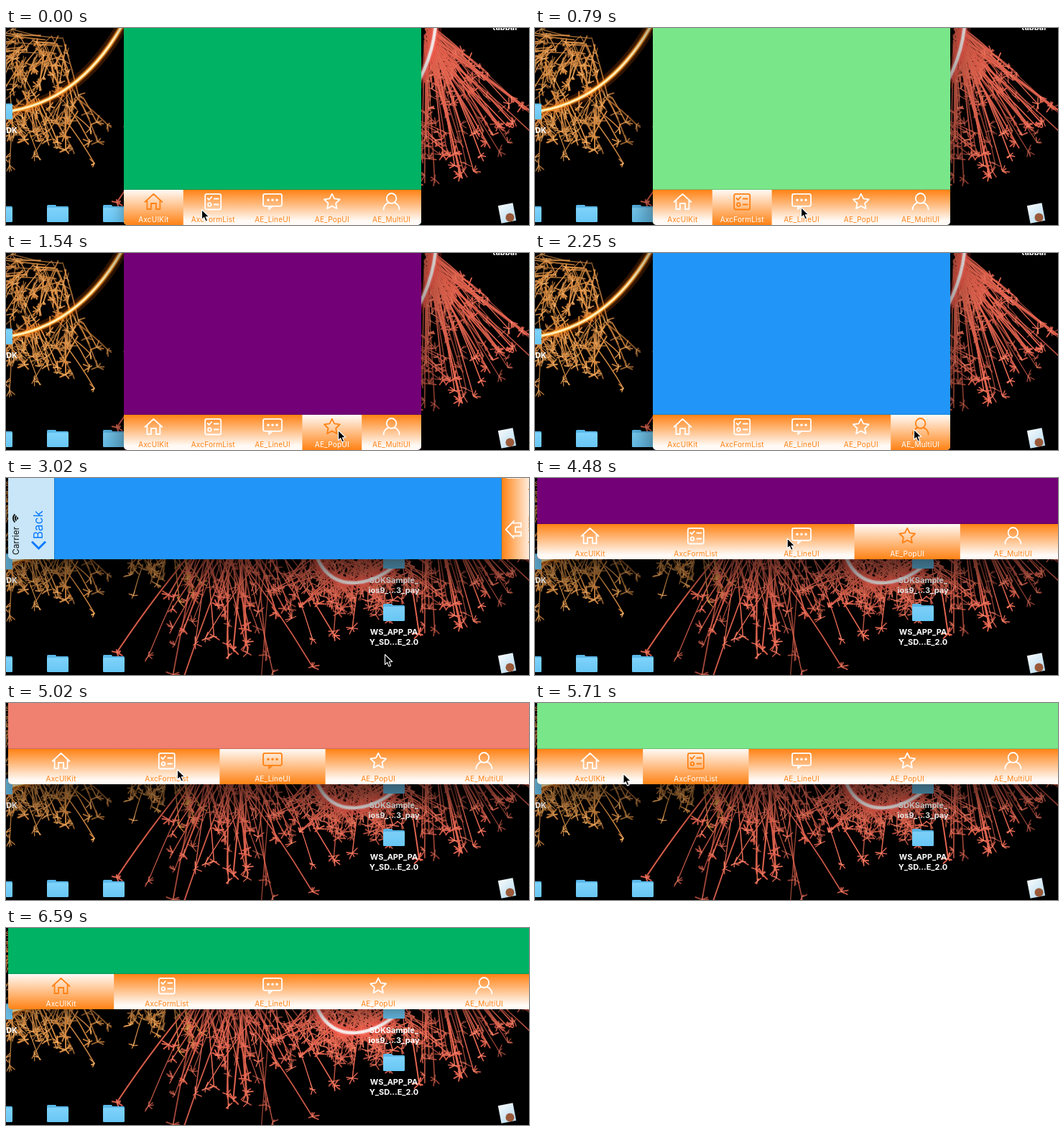
An HTML page with a canvas that plays this animation: 728x274 px, repeating every 6.69 s.

```html
<!DOCTYPE html>
<html lang="en">
<head>
<meta charset="utf-8">
<title>Tab bar demo</title>
<style>
html, body { margin: 0; width: 100%; height: 100%; overflow: hidden; background: #000; }
canvas { display: block; width: 728px; height: 274px; }
</style>
</head>
<body>
<canvas id="stage" width="728" height="274"></canvas>
<script>
const W = 728, H = 274, LOOP = 6690;
const ctx = document.getElementById('stage').getContext('2d');
const FONT = 'Inter, sans-serif';
const LABELS = ['AxcUIKit', 'AxcFormList', 'AE_LineUI', 'AE_PopUI', 'AE_MultiUI'];
const PAGES = ['#00b264', '#7ae68a', '#f08070', '#730076', '#2196f8'];
const ORANGE = '#ff8214', PALE = '#fffaf6', BAR = 49;
const CENTER = { x: 371, y: -94 }, SHORT = 414, LONG = 736;
const FOCUS = 410, BLUR = 6590, TURN = 3020, TURN_END = 3380, GONE = 6050, TICK = 60;

// Each click selects a tab; then the pointer glides on to the next click.
const CLICKS = [
  { t: 410, tab: 1, x: 272, y: 252 },
  { t: 1030, tab: 2, x: 370, y: 249 },
  { t: 1540, tab: 3, x: 462, y: 246 },
  { t: 2250, tab: 4, x: 527, y: 245, leave: 3490, glide: 470 },
  { t: 4200, tab: 3, x: 462, y: 71 },
  { t: 4780, tab: 2, x: 346, y: 84, glide: 240 },
  { t: 5260, tab: 1, x: 238, y: 92, glide: 450 },
  { t: 5770, tab: 0, x: 122, y: 98, glide: 220 }
];
const EXIT = { x: 608, y: 262 };

const clamp = v => Math.max(0, Math.min(1, v));
const lerp = (a, b, p) => a + (b - a) * p;
const easeInOut = p => p * p * (3 - 2 * p);
const easeOut = p => 1 - (1 - p) ** 2;
const ticked = (dt, span) => clamp(Math.floor(dt / TICK) * TICK / span);

function random(seed) {
  return () => {
    seed = (seed + 0x6D2B79F5) | 0;
    let r = Math.imul(seed ^ (seed >>> 15), 1 | seed);
    r = (r + Math.imul(r ^ (r >>> 7), 61 | r)) ^ r;
    return ((r ^ (r >>> 14)) >>> 0) / 4294967296;
  };
}

function text(c, str, x, y, font, color, align = 'center', spacing = 0) {
  c.font = font + ' ' + FONT;
  c.letterSpacing = spacing + 'px';
  c.textAlign = align;
  c.fillStyle = color;
  c.fillText(str, x, y);
}

function strokes(c, path, layers) {
  layers.forEach(([width, color]) => {
    c.lineWidth = width;
    c.strokeStyle = color;
    c.stroke(path);
  });
}

// ---- desktop ----
function spray(c, rnd, { x, y, spread, from, to, reach, count, color, core }) {
  for (let i = 0; i < count; i++) {
    const px = x + (rnd() - 0.5) * spread, py = y + (rnd() - 0.5) * 40;
    const a = lerp(from, to, rnd()) * Math.PI / 180;
    const len = reach * (0.2 + 0.8 * rnd() ** 1.5);
    const ex = px + Math.cos(a) * len, ey = py + Math.sin(a) * len;
    const path = new Path2D();
    path.moveTo(px, py);
    path.quadraticCurveTo(lerp(px, ex, 0.55), lerp(py, ey, 0.48), ex, ey);
    for (let k = 0; k < 6; k++) {
      const b = rnd() * 2 * Math.PI, r = 3 + rnd() * 7;
      path.moveTo(ex, ey);
      path.lineTo(ex + Math.cos(b) * r, ey + Math.sin(b) * r);
    }
    c.globalAlpha = 0.5 + rnd() * 0.5;
    strokes(c, path, [[1.2 + rnd(), color], [0.5, core]]);
  }
  c.globalAlpha = 1;
}

function folder(c, x, y) {
  const g = c.createLinearGradient(0, y - 8, 0, y + 12);
  g.addColorStop(0, '#7ed3fb');
  g.addColorStop(1, '#68c6f3');
  const box = (w, top, h, fill) => {
    c.fillStyle = fill;
    c.beginPath();
    c.roundRect(x - 15, y + top, w, h, 1.5);
    c.fill();
  };
  box(13, -12, 8, '#5ab9ea');
  box(30, -10, 8, '#5ab9ea');
  box(30, -8, 20, g);
}

function sheet(c, x, y) {
  c.save();
  c.translate(x, y);
  c.rotate(-0.19);
  const g = c.createLinearGradient(-8, -12, 8, 12);
  g.addColorStop(0, '#f4f9fc');
  g.addColorStop(1, '#b8dcf0');
  c.fillStyle = g;
  c.fillRect(-10.5, -12.5, 21, 25);
  c.restore();
  c.fillStyle = '#9a5a3a';
  c.beginPath();
  c.arc(x + 4, y + 6, 6, 0, 7);
  c.fill();
}

function makeDesktop() {
  const cv = document.createElement('canvas');
  cv.width = W;
  cv.height = H;
  const c = cv.getContext('2d'), rnd = random(27);
  c.fillStyle = '#010000';
  c.fillRect(0, 0, W, H);
  c.lineCap = 'round';

  const gold = { color: '#c8742c', core: '#ffd08a' };
  const red = { color: '#d8503f', core: '#ff9f80' };
  [
    { ...gold, x: 30, y: 30, spread: 110, from: 60, to: 200, reach: 80, count: 70 },
    { ...gold, x: 45, y: 105, spread: 130, from: 40, to: 140, reach: 80, count: 65 },
    { ...gold, x: 215, y: 105, spread: 80, from: 50, to: 145, reach: 60, count: 24 },
    { ...red, x: 325, y: 80, spread: 110, from: 52, to: 128, reach: 215, count: 75 },
    { ...red, x: 490, y: 120, spread: 150, from: 15, to: 165, reach: 85, count: 170 },
    { ...red, x: 588, y: 15, spread: 12, from: 35, to: 92, reach: 205, count: 95 }
  ].forEach(s => spray(c, rnd, s));

  strokes(c, new Path2D('M162 -4Q100 105 -4 117'),
    [[16, 'rgba(255,110,10,.2)'], [8, 'rgba(255,130,20,.5)'], [4.5, '#ffb84a'], [2.2, '#fff3c8']]);
  strokes(c, new Path2D('M598 -4C594 40 575 80 548 115C520 146 455 168 432 108'),
    [[18, 'rgba(255,70,60,.25)'], [9, 'rgba(255,110,100,.5)'], [5, '#f4c4bc'], [3, '#f8eeee']]);

  [-6, 72, 150].forEach(x => folder(c, x, 258));
  [114, 187].forEach(y => folder(c, 540, y));
  folder(c, -6, 115);
  const caption = (str, x, y, align) => text(c, str, x, y, '700 11px', '#fff', align);
  caption('DK', 16, 146, 'right');
  caption('tabbar', 695, 3);
  caption('SDKSample_', 540, 146);
  caption('ios9_...3_pay', 540, 160);
  caption('WS_APP_PA', 540, 218);
  caption('Y_SD...E_2.0', 540, 232);
  sheet(c, 697.5, 257.5);
  return cv;
}

// ---- icons, centred on x = 0 below the top of the bar ----
function homeIcon() {
  return new Path2D('M-12 17L0 5.8L12 17M-9 14.5V27H-3.5V19H3.5V27H9V14.5');
}

function listIcon() {
  const p = new Path2D('M-7.5 12L-5.5 14L-2 10M1.5 12.5H7.5M1.5 20.5H7.5');
  p.roundRect(-11, 5.8, 22, 21.7, 2.5);
  p.moveTo(-2.5, 20.5);
  p.arc(-4.8, 20.5, 2.3, 0, 7);
  return p;
}

function chatIcon() {
  const p = new Path2D('M-5 22.8V27L0 22.8');
  p.roundRect(-13, 5.8, 26, 17, 2.5);
  for (let x = -6; x <= 6; x += 6) {
    p.moveTo(x + 0.9, 14.3);
    p.arc(x, 14.3, 0.9, 0, 7);
  }
  return p;
}

function starIcon() {
  const p = new Path2D();
  for (let i = 0; i < 10; i++) {
    const a = i * Math.PI / 5 - Math.PI / 2, r = i % 2 ? 5.6 : 11.4;
    p.lineTo(Math.cos(a) * r, 17 + Math.sin(a) * r);
  }
  p.closePath();
  return p;
}

function userIcon() {
  const p = new Path2D('M-11 27.5C-11 22 -7 18.5 -3.5 18M11 27.5C11 22 7 18.5 3.5 18');
  p.moveTo(6.8, 12);
  p.ellipse(0, 12, 6.8, 7, 0, 0, 7);
  return p;
}

const ICONS = [homeIcon(), listIcon(), chatIcon(), starIcon(), userIcon()];

// ---- app ----
function fade(top, from, to, end) {
  const g = ctx.createLinearGradient(0, top, 0, top + BAR * end);
  g.addColorStop(0, from);
  g.addColorStop(1, to);
  return g;
}

function hairline(w, y) {
  ctx.fillStyle = 'rgba(0,0,0,.3)';
  ctx.fillRect(0, y, w, 0.5);
}

function drawBar(w, top, selected) {
  const cell = w / LABELS.length;
  hairline(w, top - 0.5);
  ctx.fillStyle = fade(top, ORANGE, PALE, 0.88);
  ctx.fillRect(0, top, w, BAR);
  ctx.fillStyle = fade(top, PALE, ORANGE, 1);
  ctx.fillRect(cell * selected, top, cell, BAR);
  ctx.lineWidth = 1.8;
  ctx.lineCap = ctx.lineJoin = 'round';
  LABELS.forEach((label, i) => {
    const on = i === selected, x = cell * (i + 0.5);
    ctx.strokeStyle = on ? ORANGE : '#fff';
    ctx.translate(x, top);
    ctx.stroke(ICONS[i]);
    ctx.translate(-x, -top);
    text(ctx, label, x, top + 45, '400 10px', on ? '#fff' : ORANGE, 'center', 0.2);
  });
}

function drawNav(w) {
  ctx.fillStyle = '#c8e6f8';
  ctx.fillRect(0, 0, w, 64);
  hairline(w, 64);
  text(ctx, 'Carrier', 6, 15, '400 12px', '#111', 'left');
  ctx.strokeStyle = '#111';
  ctx.lineWidth = 2;
  for (let r = 2; r <= 8; r += 3) {
    ctx.beginPath();
    ctx.arc(57, 15, r, -Math.PI * 0.75, -Math.PI * 0.25);
    ctx.stroke();
  }
  ctx.strokeStyle = '#0a7aff';
  ctx.lineWidth = 3;
  ctx.stroke(new Path2D('M24.5 33L15 42.5L24.5 52'));
  text(ctx, 'Back', 28, 48, '400 17px', '#0a7aff', 'left');
}

function drawWindow(t, tab) {
  const wide = t >= TURN, active = t >= FOCUS && t < BLUR;
  const w = wide ? LONG : SHORT, h = wide ? SHORT : LONG;
  // the frame flips at once, the page inside turns after it
  const turn = wide ? easeInOut(ticked(t - TURN, TURN_END - TURN)) : 1;
  const pw = wide ? lerp(SHORT, LONG, turn) : w, ph = SHORT + LONG - pw;

  ctx.save();
  ctx.beginPath();
  ctx.roundRect(CENTER.x - w / 2, CENTER.y - h / 2, w, h, 5);
  ctx.save();
  ctx.shadowColor = active ? 'rgba(0,0,0,.65)' : 'rgba(0,0,0,.4)';
  ctx.shadowBlur = active ? 50 : 22;
  ctx.shadowOffsetY = active ? 22 : 8;
  ctx.fillStyle = '#000';
  ctx.fill();
  ctx.restore();
  ctx.clip();
  ctx.translate(CENTER.x, CENTER.y);
  ctx.rotate((turn - 1) * Math.PI / 2);
  ctx.translate(-pw / 2, -ph / 2);
  ctx.fillStyle = PAGES[tab];
  ctx.fillRect(0, 0, pw, ph);
  drawNav(pw);
  drawBar(pw, ph - BAR, tab);
  ctx.restore();
}

const ARROW = new Path2D('M.5 .5V14.5L3.7 11.6L6 17L8.6 15.9L6.3 10.7L10.7 10.5Z');

function drawCursor(t, last) {
  if (t >= GONE) return;
  const from = CLICKS[Math.max(last, 0)];
  const to = last < 0 ? from : CLICKS[last + 1] || EXIT;
  const { leave = from.t, glide = 300 } = from;
  const p = easeOut(ticked(t - leave, glide));
  ctx.save();
  ctx.translate(lerp(from.x, to.x, p), lerp(from.y, to.y, p));
  ctx.fillStyle = '#000';
  ctx.strokeStyle = '#fff';
  ctx.lineWidth = 1.1;
  ctx.lineJoin = 'round';
  ctx.fill(ARROW);
  ctx.stroke(ARROW);
  ctx.restore();
}

const desktop = makeDesktop();
const start = performance.now();

function frame() {
  const t = (performance.now() - start) % LOOP;
  const last = CLICKS.filter(c => c.t <= t).length - 1;
  ctx.drawImage(desktop, 0, 0);
  drawWindow(t, last < 0 ? 0 : CLICKS[last].tab);
  drawCursor(t, last);
  requestAnimationFrame(frame);
}
frame();
</script>
</body>
</html>
```
